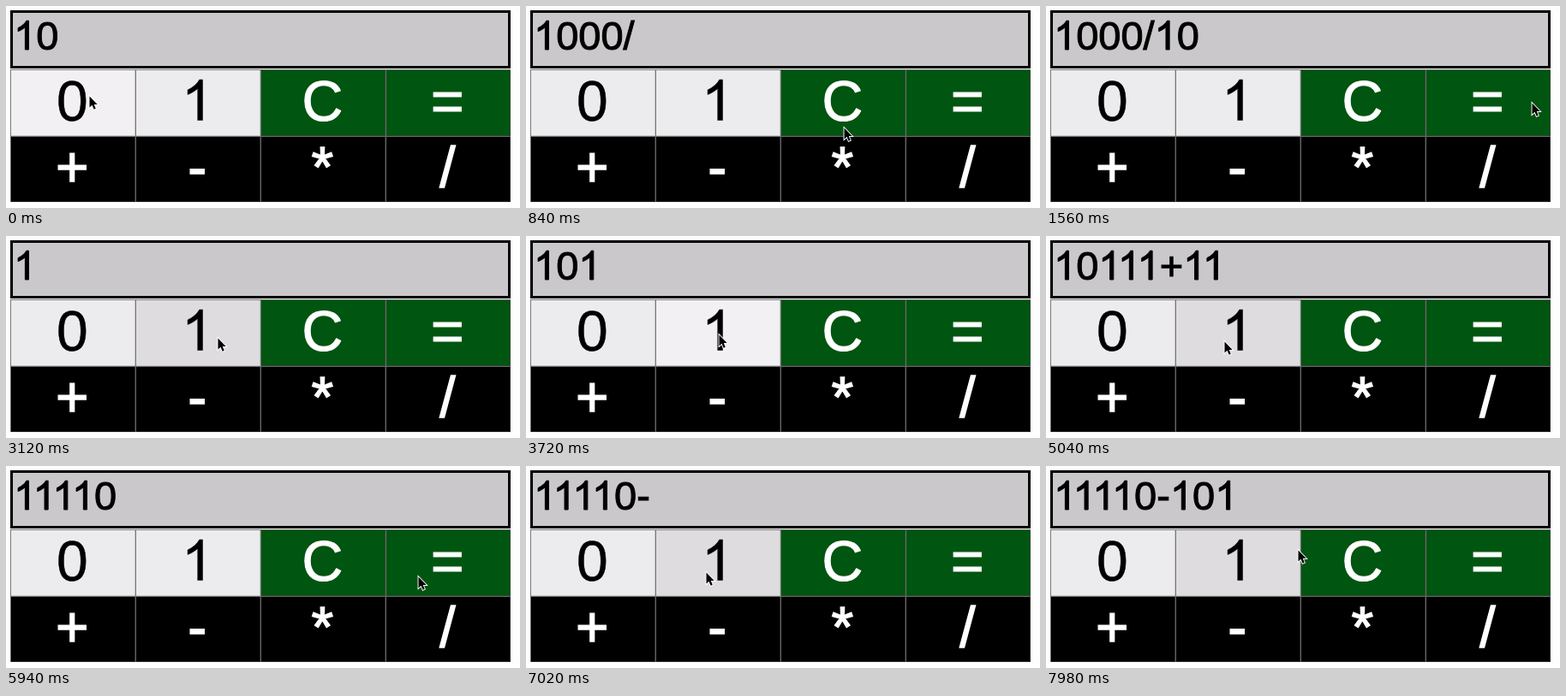
Recreate the animation shown at these times as an HTML page with a canvas. Size 600 by 236 pixels, loop 8000 ms.

```html
<!DOCTYPE html>
<html lang="en">
<head>
<meta charset="utf-8">
<title>Binary calculator</title>
<style>
html, body { margin: 0; height: 100%; overflow: hidden; background: #fefefe; }
canvas { display: block; }
</style>
</head>
<body>
<canvas id="stage" width="600" height="236"></canvas>
<script>
const ctx = document.getElementById('stage').getContext('2d');
const LOOP = 8000, STEP = 60;
const SETTLE = 60, REPEAT = 200, HOLD = 100;
const LEFT = 5, TOP = 74, CELL_W = 146, CELL_H = 78;
const FAMILY = '"Liberation Sans", Arial, sans-serif';

const LIGHT = { fill: '#ecebed', hover: '#dfdcdf', press: '#f2f0f3', ink: '#000', weight: 0.5, lit: '#777', shade: '#c4c3c5' };
const GREEN = { fill: '#005510', press: '#055c16', ink: '#fff', weight: 1.2, lit: '#667268', shade: '#2c4a32' };
const BLACK = { fill: '#000', press: '#151515', ink: '#fff', weight: 1.4, lit: '#666', shade: '#2a2a2a' };

const buttons = [...'01C=+-*/'].map((label, i) => {
  const col = i % 4, row = i >> 2;
  return {
    label, row,
    x: LEFT + col * CELL_W, y: TOP + row * CELL_H,
    w: CELL_W, h: CELL_H - row,
    style: row ? BLACK : col < 2 ? LIGHT : GREEN
  };
});

// Where the pointer stops: keys clicked there, arrival time, position
const visits = [
  ['00', 0, 97, 105], ['/', 600, 510, 162], ['1', 960, 232, 122],
  ['0', 1200, 95, 116], ['', 1560, 567, 113], ['=', 1680, 575, 116],
  ['', 2160, 470, 165], ['C', 2580, 372, 118], ['1', 3000, 247, 119],
  ['0', 3260, 95, 117], ['111', 3500, 225, 115], ['+', 4140, 95, 165],
  ['', 4380, 281, 134], ['111', 4700, 208, 123], ['=', 5640, 515, 125],
  ['-', 6600, 230, 162], ['1', 7080, 208, 121], ['0', 7380, 95, 117],
  ['1', 7680, 235, 112], ['', 7980, 294, 98]
].map(([keys, arrive, x, y]) => {
  const clicks = [...keys].map((label, i) => ({ label, time: arrive + SETTLE + i * REPEAT }));
  const leave = clicks.length ? clicks.at(-1).time + SETTLE : arrive;
  return { clicks, arrive, leave, x, y };
});
const clicks = visits.flatMap(visit => visit.clicks);

function pointerAt(t) {
  const i = visits.findLastIndex(visit => visit.arrive <= t);
  const from = visits[i], to = visits[i + 1] || from;
  const u = t <= from.leave ? 0 : (t - from.leave) / (to.arrive - from.leave);
  const k = u * u * (3 - 2 * u);
  return [Math.round(from.x + (to.x - from.x) * k), Math.round(from.y + (to.y - from.y) * k)];
}

function evaluate(text) {
  const [, a, op, b] = text.match(/^([01]+)([-+*/])([01]+)$/);
  const m = parseInt(a, 2), n = parseInt(b, 2);
  return Math.floor({ '+': m + n, '-': m - n, '*': m * n, '/': m / n }[op]).toString(2);
}

function displayAt(t) {
  return clicks.filter(click => click.time <= t).reduce((text, { label }) =>
    label === 'C' ? '' : label === '=' ? evaluate(text) : text + label, '10');
}

// The numeral one has no foot, unlike the installed face
const one = new Path2D('M763 0H583V-1147Q518-1085 412-1023T222-930V-1104Q373-1175 486-1276T646-1472H763Z');

function drawText(text, x, baseline, size, color, weight) {
  ctx.font = `${size}px ${FAMILY}`;
  ctx.fillStyle = ctx.strokeStyle = color;
  ctx.lineJoin = 'miter';
  [...text].forEach((char, i) => {
    ctx.save();
    if (char === '1') {
      if (text[i - 1] === '1') x -= size * 0.074;
      const scale = size / 2048;
      ctx.translate(x, baseline);
      ctx.scale(scale, scale);
      ctx.lineWidth = weight / scale;
      ctx.fill(one);
      ctx.stroke(one);
    } else {
      ctx.lineWidth = weight;
      ctx.fillText(char, x, baseline);
      ctx.strokeText(char, x, baseline);
    }
    ctx.restore();
    x += ctx.measureText(char).width;
  });
}

function rect(color, x, y, w, h) {
  ctx.fillStyle = color;
  ctx.fillRect(x, y, w, h);
}

function drawButton({ label, row, x, y, w, h, style }, hovered, pressed) {
  rect(style.lit, x, y, w, h);
  rect(style.shade, x + 1, y + 1, w - 1, h - 1);
  const fill = pressed ? style.press : hovered && style.hover || style.fill;
  rect(fill, x + 1, y + 1, w - 2, h - 2);
  ctx.font = `66px ${FAMILY}`;
  const left = x + (w - ctx.measureText(label).width) / 2 - 0.7;
  drawText(label, left, row ? 211 : 133.5, 66, style.ink, style.weight);
}

const arrow = new Path2D('M0 0V14.2L3.3 11.2L5.6 16.6L7.9 15.6L5.7 10.4H10Z');

function drawPointer(x, y) {
  ctx.save();
  ctx.translate(x + 0.5, y + 0.5);
  ctx.scale(0.92, 0.92);
  ctx.lineWidth = 2;
  ctx.strokeStyle = '#fff';
  ctx.stroke(arrow);
  ctx.fillStyle = '#000';
  ctx.fill(arrow);
  ctx.restore();
}

function draw(t) {
  const [px, py] = pointerAt(t);
  const held = clicks.find(({ time }) => t < time && t >= time - HOLD);
  rect('#fefefe', 0, 0, 600, 236);
  rect('#000', 5, 5, 584, 68);
  rect('#cac8cb', 8, 8, 578, 62);
  drawText(displayAt(t), 9, 51, 47, '#000', 1);
  for (const b of buttons) {
    const hovered = px >= b.x && px < b.x + b.w && py >= b.y && py < b.y + b.h;
    drawButton(b, hovered, hovered && held?.label === b.label);
  }
  drawPointer(px, py);
}

const start = performance.now();
function tick() {
  const t = (performance.now() - start) % LOOP;
  draw(Math.floor(t / STEP) * STEP);
  requestAnimationFrame(tick);
}
tick();
</script>
</body>
</html>
```
